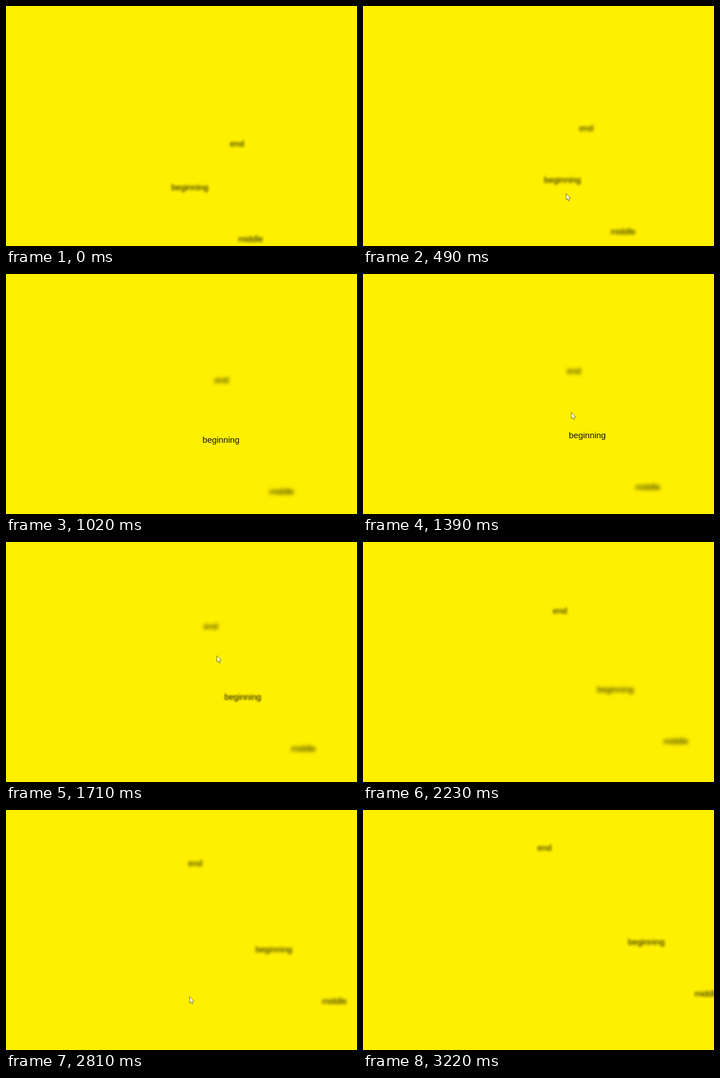
An HTML page with a canvas for the animation above (3320 ms loop, 610 by 418 pixels).

```html
<!DOCTYPE html>
<html lang="en">
<head>
<meta charset="utf-8">
<title>Drifting words</title>
<style>
  html, body { margin: 0; width: 100%; height: 100%; overflow: hidden; background: #fff000; }
  canvas { display: block; }
</style>
</head>
<body>
<canvas id="stage" width="610" height="418"></canvas>
<script>
const ctx = document.getElementById('stage').getContext('2d');
const LOOP = 3320;
const STEP = 101;
const LAST = 32;

// Start, drift per step, and the moment each word comes into focus
const WORDS = [
  { text: 'beginning', x: 319.7, y: 321.2, dx: 5.4, dy: -2.7, focus: { at: 12.3, span: 5.2, depth: 3.1 } },
  { text: 'end', x: 401.7, y: 244.6, dx: -2.7, dy: -5.42, focus: { at: 22, span: 2, depth: 1.1 } },
  { text: 'middle', x: 425, y: 411.3, dx: 5.4, dy: -2.7 }
];

// Pointer stops: step and tip
const STOPS = [
  { k: 5, x: 353, y: 326.5 },
  { k: 17, x: 366.5, y: 198 },
  { k: 25, x: 326, y: 246 },
  { k: 29, x: 312, y: 404 }
];

const ARROW = new Path2D('M0 0V11L2.4 9L4 13L6 12.2L4.8 8.4L7.6 8Z');

function blurAt(k, focus) {
  const haze = 2.3 + 0.9 * Math.sin(Math.PI * k / LAST);
  if (!focus) return haze;
  const clear = focus.depth * Math.exp(-(((k - focus.at) / focus.span) ** 2));
  return Math.max(0.2, haze - clear);
}

function drawWord(w, k) {
  ctx.filter = `blur(${blurAt(k, w.focus).toFixed(2)}px)`;
  ctx.fillStyle = '#121200';
  ctx.fillText(w.text, w.x + w.dx * k, w.y + w.dy * k);
  ctx.filter = 'none';
}

function pointerAt(k) {
  let i = 1;
  while (i < STOPS.length - 1 && STOPS[i].k < k) i++;
  const a = STOPS[i - 1], b = STOPS[i];
  const p = (k - a.k) / (b.k - a.k);
  return [a.x + (b.x - a.x) * p, a.y + (b.y - a.y) * p];
}

function drawPointer(k) {
  ctx.save();
  ctx.translate(...pointerAt(k));
  ctx.fillStyle = '#fffbc4';
  ctx.fill(ARROW);
  ctx.lineWidth = 0.8;
  ctx.strokeStyle = '#5c5828';
  ctx.stroke(ARROW);
  ctx.restore();
}

function render(time) {
  const k = Math.min(LAST, Math.floor((time + 16) / STEP));
  ctx.fillStyle = '#fff000';
  ctx.fillRect(0, 0, 610, 418);
  ctx.font = '14.8px "Liberation Sans", Arial, sans-serif';
  ctx.textAlign = 'center';
  WORDS.forEach(w => drawWord(w, k));
  // The pointer flickers on every second step
  if (k % 2) drawPointer(k);
}

const start = performance.now();
function tick() {
  render((performance.now() - start) % LOOP);
  requestAnimationFrame(tick);
}
tick();
</script>
</body>
</html>
```
